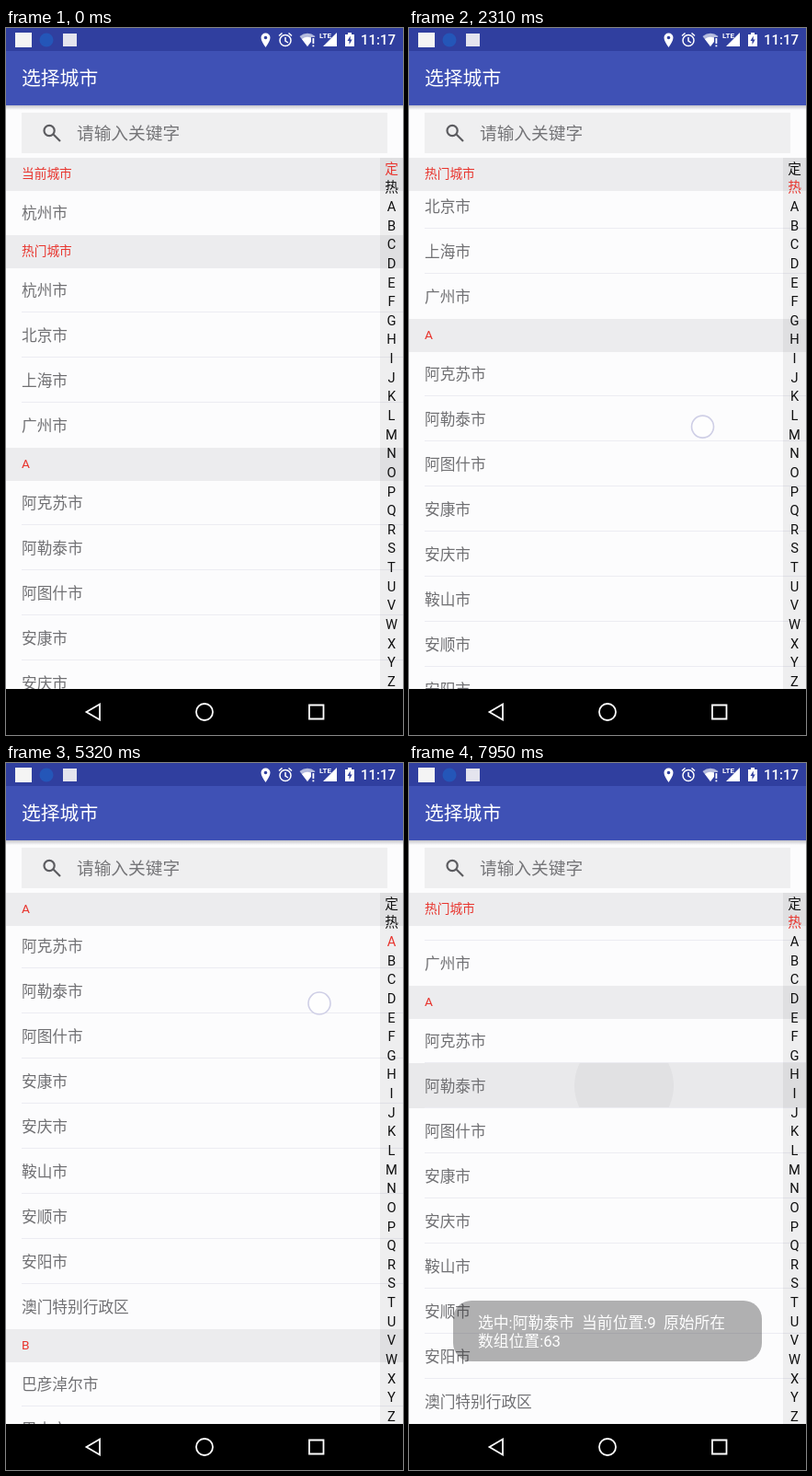
An HTML page with a canvas that plays this animation: 432 by 768 pixels, repeating every 8000 ms.

```html
<!DOCTYPE html>
<html lang="zh-CN">
<head>
<meta charset="utf-8">
<title>选择城市</title>
<style>
html, body { margin: 0; width: 100%; height: 100%; overflow: hidden; background: #000; }
canvas { display: block; width: 432px; height: 768px; }
</style>
</head>
<body>
<canvas id="stage" width="432" height="768"></canvas>
<script>
const LOOP = 8000, LIST_TOP = 141, LIST_BOTTOM = 718, HEADER_H = 35, ITEM_H = 49;
const PAGE = '#fcfcfd', BAND = '#ececee', INK = '#707073', RED = '#e8352e', STATUS = '#303f9f';
const FONT = 'Roboto, "Noto Sans CJK SC", "Noto Sans CJK", sans-serif';
const ctx = document.getElementById('stage').getContext('2d');

const sections = [
  ['定', '当前城市', '杭州市'],
  ['热', '热门城市', '杭州市 北京市 上海市 广州市'],
  ['A', 'A', '阿克苏市 阿勒泰市 阿图什市 安康市 安庆市 鞍山市 安顺市 安阳市 澳门特别行政区'],
  ['B', 'B', '巴彦淖尔市 巴中市 白城市']
];
const indexKeys = [...'定热ABCDEFGHIJKLMNOPQRSTUVWXYZ'];

const headers = [], items = [];
let nextTop = LIST_TOP;
for (const [key, title, names] of sections) {
  headers.push({ key, title, top: nextTop });
  nextTop += HEADER_H;
  names.split(' ').forEach((name, i, all) => {
    items.push({ name, top: nextTop, last: i === all.length - 1 });
    nextTop += ITEM_H;
  });
}
const pressedItem = items.find(item => item.name === '阿勒泰市');

// Knots are [time, value]
const scrollKnots = [[450, 0], [1610, 96], [3010, 183], [4230, 278], [4830, 336], [5320, 317], [6120, 248], [6750, 214]];
const fingerX = [[200, 300], [1610, 313], [3010, 326], [4230, 337], [4830, 345], [5320, 341], [6120, 326], [6750, 322]];
const fingerY = [[200, 582], [1610, 478], [3010, 388], [4230, 295], [4830, 238], [5320, 261], [6120, 332], [6750, 366]];

const clamp01 = v => Math.max(0, Math.min(1, v));
const ramp = (t, from, to) => clamp01((t - from) / (to - from));

// Monotone cubic interpolation that rests at both ends
function track(knots, t) {
  const n = knots.length - 1;
  if (t <= knots[0][0]) return knots[0][1];
  if (t >= knots[n][0]) return knots[n][1];
  const slope = i => (knots[i + 1][1] - knots[i][1]) / (knots[i + 1][0] - knots[i][0]);
  const tangent = i => {
    if (i === 0 || i === n) return 0;
    const a = slope(i - 1), b = slope(i);
    return a * b <= 0 ? 0 : 2 * a * b / (a + b);
  };
  const i = knots.findIndex(k => k[0] > t) - 1;
  const [t0, v0] = knots[i], [t1, v1] = knots[i + 1];
  const d = t1 - t0, u = (t - t0) / d, w = 1 - u;
  return v0 * (1 + 2 * u) * w * w + v1 * u * u * (3 - 2 * u) + d * u * w * (tangent(i) * w - tangent(i + 1) * u);
}

function rect(x, y, w, h, color) {
  ctx.fillStyle = color;
  ctx.fillRect(x, y, w, h);
}

function text(str, x, centerY, size, color, align = 'left', weight = 400) {
  ctx.font = `${weight} ${size}px ${FONT}`;
  ctx.textAlign = align;
  ctx.fillStyle = color;
  ctx.fillText(str, x, Math.round(centerY + size * 0.36));
}

function disc(x, y, r, color) {
  ctx.beginPath();
  ctx.arc(x, y, r, 0, 7);
  ctx.fillStyle = color;
  ctx.fill();
}

function fillPath(d, color) {
  ctx.fillStyle = color;
  ctx.fill(new Path2D(d), 'evenodd');
}

function strokePath(d, color, width) {
  ctx.strokeStyle = color;
  ctx.lineWidth = width;
  ctx.stroke(new Path2D(d));
}

function drawStatusBar() {
  rect(0, 0, 432, 25, STATUS);
  rect(10, 5, 18, 16, '#f4f4f4');
  disc(44, 13, 7.5, '#2456b8');
  rect(62, 6, 15, 14, '#e4e4ee');
  fillPath('M282.500 21C280 17 277.500 14 277.500 10.500A5 5 0 0 1 287.500 10.500C287.500 14 285 17 282.500 21ZM280.700 10.500a1.800 1.800 0 1 0 3.600 0a1.800 1.800 0 1 0 -3.600 0Z', '#fff');
  strokePath('M298 13.500a6 6 0 1 0 12 0a6 6 0 1 0 -12 0M304 10v4l3 2M297 8.500l3.500 -3M311 8.500l-3.500 -3', '#fff', 1.5);
  fillPath('M319.500 9Q328 2.500 336.500 9L328 20Z', '#b4bbdd');
  fillPath('M322 12Q328 7.500 334 12L328 20Z', '#fff');
  rect(332, 10, 5, 11, STATUS);
  rect(333.5, 11, 1.8, 6, '#fff');
  rect(333.5, 18.5, 1.8, 1.8, '#fff');
  fillPath('M345 20L360 5V20Z', '#fff');
  text('LTE', 341, 8, 8, '#fff', 'left', 700);
  fillPath('M369 7H372V5H376V7H379V20H369ZM374.700 8.500L371.500 14H373.500V18L376.700 12.500H374.700Z', '#fff');
  text('11:17', 424, 13, 15, '#fff', 'right', 500);
}

function drawTopArea() {
  rect(0, 25, 432, 59, '#3f51b5');
  text('选择城市', 17, 54.5, 20.8, '#fff');
  const shadow = ctx.createLinearGradient(0, 84, 0, 89);
  shadow.addColorStop(0, '#c4c4ca');
  shadow.addColorStop(1, PAGE);
  rect(0, 84, 432, 5, shadow);
  rect(17, 92, 398, 44, '#efeff0');
  strokePath('M41.500 111.500a5.600 5.600 0 1 0 11.200 0a5.600 5.600 0 1 0 -11.200 0M51.500 115.500L59 123', '#5c5c60', 2.2);
  text('请输入关键字', 77, 114.5, 18.7, '#757578');
}

function drawPress(t, y) {
  const dragPress = 0.45 * ramp(t, 350, 550) * (1 - ramp(t, 1610, 2000));
  const tapPress = ramp(t, 7620, 7800);
  ctx.globalAlpha = Math.max(dragPress, tapPress);
  rect(0, y, 432, ITEM_H, '#e9e9eb');
  ctx.globalAlpha = 1;
  const spread = ramp(t, 7690, 7950);
  if (!spread) return;
  ctx.save();
  ctx.beginPath();
  ctx.rect(0, y, 432, ITEM_H);
  ctx.clip();
  disc(325 - 91 * spread, y + 24.5, 54 * spread, '#e1e1e3');
  ctx.restore();
}

function drawHeader(title, y) {
  rect(0, y, 432, HEADER_H + 1, BAND);
  text(title, 17, y + 17.5, 13.7, RED);
}

function drawList(t, scroll) {
  ctx.save();
  ctx.beginPath();
  ctx.rect(0, LIST_TOP, 432, LIST_BOTTOM - LIST_TOP);
  ctx.clip();
  for (const item of items) {
    const y = item.top - scroll;
    if (item === pressedItem) drawPress(t, y);
    text(item.name, 17, y + 24.5, 16.7, INK);
    if (!item.last) rect(17, y + ITEM_H - 1, 415, 1, '#ececf2');
  }
  headers.forEach(h => drawHeader(h.title, h.top - scroll));

  const current = headers.filter(h => h.top - scroll <= LIST_TOP).length - 1;
  const following = headers[current + 1].top - scroll;
  drawHeader(headers[current].title, Math.min(LIST_TOP, following - HEADER_H));
  ctx.restore();

  rect(407, LIST_TOP, 25, LIST_BOTTOM - LIST_TOP, 'rgba(0,0,10,.055)');
  indexKeys.forEach((key, i) => {
    const color = key === headers[current].key ? RED : '#111';
    text(key, 419.5, 152.5 + i * 20.63, 14.7, color, 'center');
  });
}

function drawNavBar() {
  rect(0, LIST_BOTTOM, 432, 50, '#000');
  strokePath('M102 734.500V751.500L87.500 743Z', '#fff', 1.8);
  strokePath('M207 743a9 9 0 1 0 18 0a9 9 0 1 0 -18 0', '#fff', 1.8);
  strokePath('M330 735.500h15.500v15h-15.500Z', '#fff', 1.8);
}

function drawToast(alpha) {
  ctx.globalAlpha = alpha;
  ctx.beginPath();
  ctx.roundRect(48, 584, 336, 66, 20);
  ctx.fillStyle = '#323236';
  ctx.fill();
  ctx.globalAlpha = Math.min(1, alpha * 2.6);
  text('选中:阿勒泰市\u00a0 当前位置:9\u00a0 原始所在', 75, 608, 16.8, '#fff');
  text('数组位置:63', 75, 628, 16.8, '#fff');
  ctx.globalAlpha = 1;
}

function drawFinger(x, y) {
  disc(x, y, 12, 'rgba(255,255,255,.6)');
  ctx.strokeStyle = '#cfcfe6';
  ctx.lineWidth = 1.6;
  ctx.stroke();
}

function draw(t) {
  const scroll = Math.round(track(scrollKnots, t));
  rect(0, 0, 432, 768, PAGE);
  drawStatusBar();
  drawTopArea();
  drawList(t, scroll);
  drawNavBar();
  if (t > 200 && t < 6850) drawFinger(track(fingerX, t), track(fingerY, t));
  if (t > 7560 && t < 7740) drawFinger(325, 352);
  if (t > 7800) drawToast(0.38 * ramp(t, 7800, 7950));
}

const start = performance.now();
function tick() {
  draw((performance.now() - start) % LOOP);
  requestAnimationFrame(tick);
}
tick();
</script>
</body>
</html>
```
